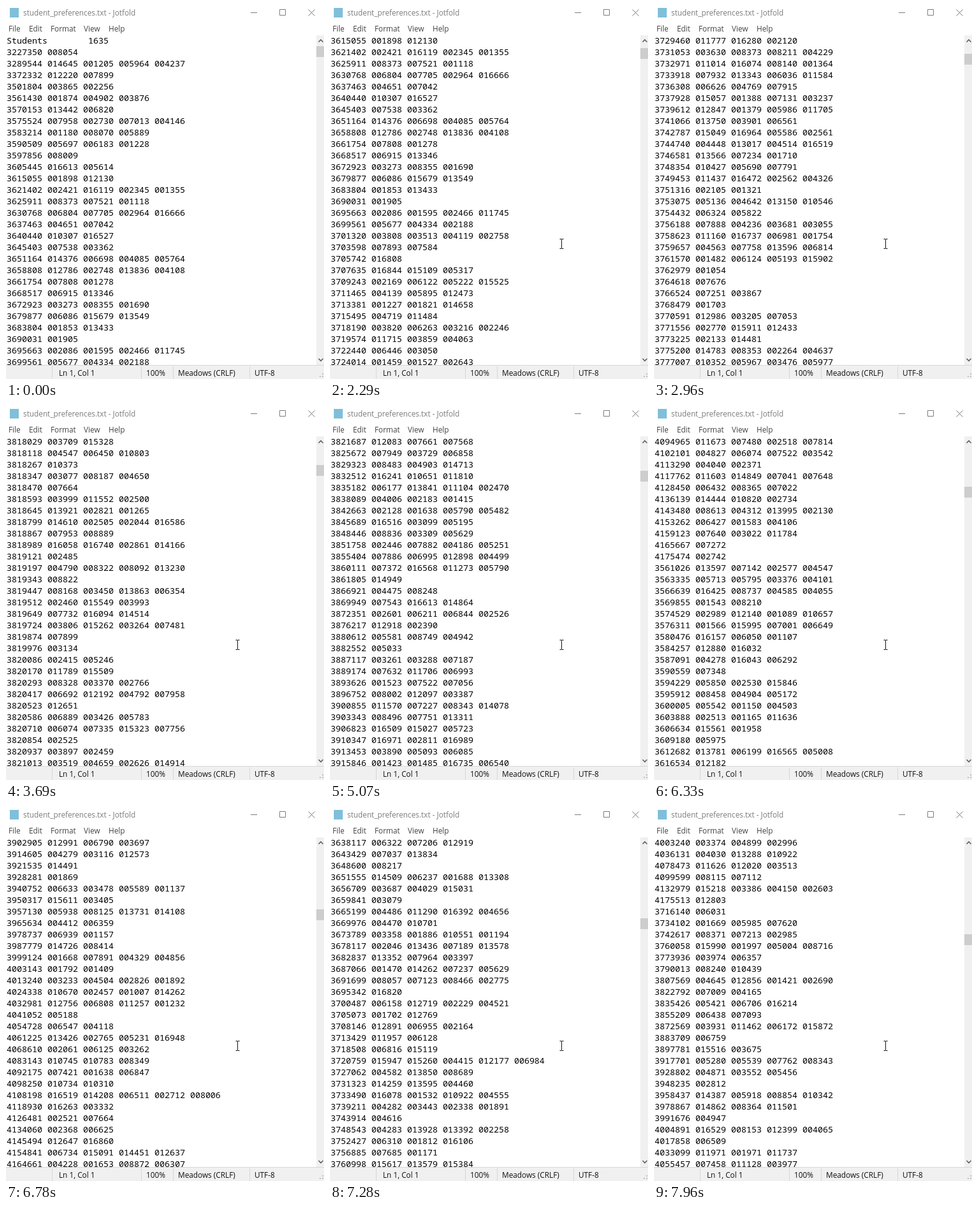
Animation of 499 by 585 pixels, one loop 7.99 s. Source, as an HTML page:

```html
<!DOCTYPE html>
<html lang="en">
<head>
<meta charset="utf-8">
<style>
  html, body { margin: 0; width: 100%; height: 100%; overflow: hidden; background: #fff; }
  svg, pre { position: absolute; left: 0; top: 0; margin: 0; }
  svg { font: 11.8px "Open Sans", "Noto Sans", sans-serif; fill: #111; }
  pre { left: 1px; top: 45px; width: 484px; height: 518px; overflow: hidden;
        font: 500 13.333px/18px "Noto Sans Mono", monospace; color: #000; }
</style>
</head>
<body>
<pre id="page"></pre>
<svg width="499" height="585" viewBox="0 0 499 585">
  <rect x="6" y="3" width="14" height="15" fill="#7fbfda"/>
  <text x="27" y="15" fill="#7c7c7c">student_preferences.txt - Jotfold</text>
  <path d="M384 10.5h10M429.5 5.5h9v9h-9zM474.5 5.5l10 10M484.5 5.5l-10 10" fill="none" stroke="#7c7c7c"/>
  <g fill="#444">
    <text x="4" y="40">File</text><text x="36" y="40">Edit</text><text x="70" y="40">Format</text>
    <text x="122" y="40">View</text><text x="161" y="40">Help</text>
  </g>
  <rect x="487" y="46" width="12" height="517" fill="#f0f0f0"/>
  <path d="M490.5 56.5l3.5-3.5 3.5 3.5M490.5 553l3.5 3.5 3.5-3.5" fill="none" stroke="#606060" stroke-width="1.6"/>
  <rect id="thumb" x="487" width="12" height="17" fill="#cdcdcd"/>
  <rect y="563" width="499" height="22" fill="#f0f0f0"/>
  <path d="M0 563.5h499M72.5 565v20M212.5 565v20M262.5 565v20M382.5 565v20" stroke="#d7d7d7"/>
  <text x="83" y="580">Ln 1, Col 1</text><text x="220" y="580">100%</text>
  <text x="270" y="580">Meadows (CRLF)</text><text x="390" y="580">UTF-8</text>
  <path d="M496 576h2v2h-2zM496 580h2v2h-2zM492 580h2v2h-2z" fill="#bfbfbf"/>
  <path id="pointer" d="M-3 -7.5h2.5l.5.5.5-.5h2.5M0 -7v14M-3 7.5h2.5l.5-.5.5.5h2.5" fill="none" stroke="#111"/>
</svg>
<script>
const LOOP = 7990, ROWS = 29, LINES = 500;

let seed = 1635;
const random = () => (seed = seed * 16807 % 2147483647) / 2147483647;
const between = (a, b) => Math.floor(a + random() * (b - a));

// Student numbers rise between these [line, number] points and start over in each group
const idPoints = [[1, 3227350], [5, 3561430], [12, 3615055], [28, 3699561], [40, 3724014],
  [95, 3818029], [129, 3821687], [155, 3910347], [215, 4094965], [225, 4175474], [226, 3561026],
  [332, 3902905], [361, 4174206], [362, 3561400], [464, 4003240], [469, 4175513], [470, 3716140],
  [LINES, 4175433]];

function studentId(line) {
  const next = idPoints.findIndex(([at]) => at >= line);
  const [b, high] = idPoints[next];
  if (b === line) return high;
  const [a, low] = idPoints[next - 1];
  return Math.round(low + (high - low) * (line - a + random() * .6 - .3) / (b - a));
}

// Most students chose three or four courses
const codeCount = () => [..."1122233334444"][between(0, 13)] * 1 + (random() < .04);
const code = () => "0" + String(random() < .7 ? between(1001, 8900) : between(10300, 16990)).padStart(5, "0");

const lines = ["Students        1635"];
for (let i = 1; i < LINES; i++)
  lines.push([studentId(i), ...Array.from({ length: codeCount() }, code)].join(" "));

// Turns of the mouse wheel: first step, last step, number of steps
const turns = [[1500, 1500, 1], [1700, 1700, 1], [1900, 1900, 1], [2290, 2500, 5], [2930, 3060, 4],
  [3520, 3690, 5], [4590, 4710, 5], [5070, 5190, 5], [5500, 5620, 5], [5900, 5980, 4],
  [6330, 6780, 14], [7040, 7610, 15], [7960, 7960, 1]];

function stepsDone(t, start, end, count) {
  if (t < start) return 0;
  if (t >= end) return count;
  return Math.floor((t - start) / (end - start) * (count - 1)) + 1;
}

// A turn starts with three lines, then speeds up; long turns go fastest
function topLine(t) {
  let top = 0;
  for (const turn of turns) {
    const done = stepsDone(t, ...turn);
    if (done) top += 3 + (done - 1) * (turn[2] > 5 ? 9 : 7);
  }
  return top;
}

const [page, thumb, pointer] = ["page", "thumb", "pointer"].map(id => document.getElementById(id));
let shown = -1;

function draw(t) {
  const top = topLine(t);
  if (top !== shown) {
    page.textContent = lines.slice(top, top + ROWS).join("\n");
    thumb.setAttribute("y", 63 + Math.round(top * .29));
    shown = top;
  }
  const step = stepsDone(t, 260, 480, 8), away = ((8 - step) / 7) ** 1.5;
  pointer.style.display = step ? "" : "none";
  pointer.setAttribute("transform", `translate(${Math.round(363 + 77 * away) + .5} ${Math.round(373 + 137 * away)})`);
}

function tick() {
  draw(performance.now() % LOOP);
  requestAnimationFrame(tick);
}
tick();
</script>
</body>
</html>
```
